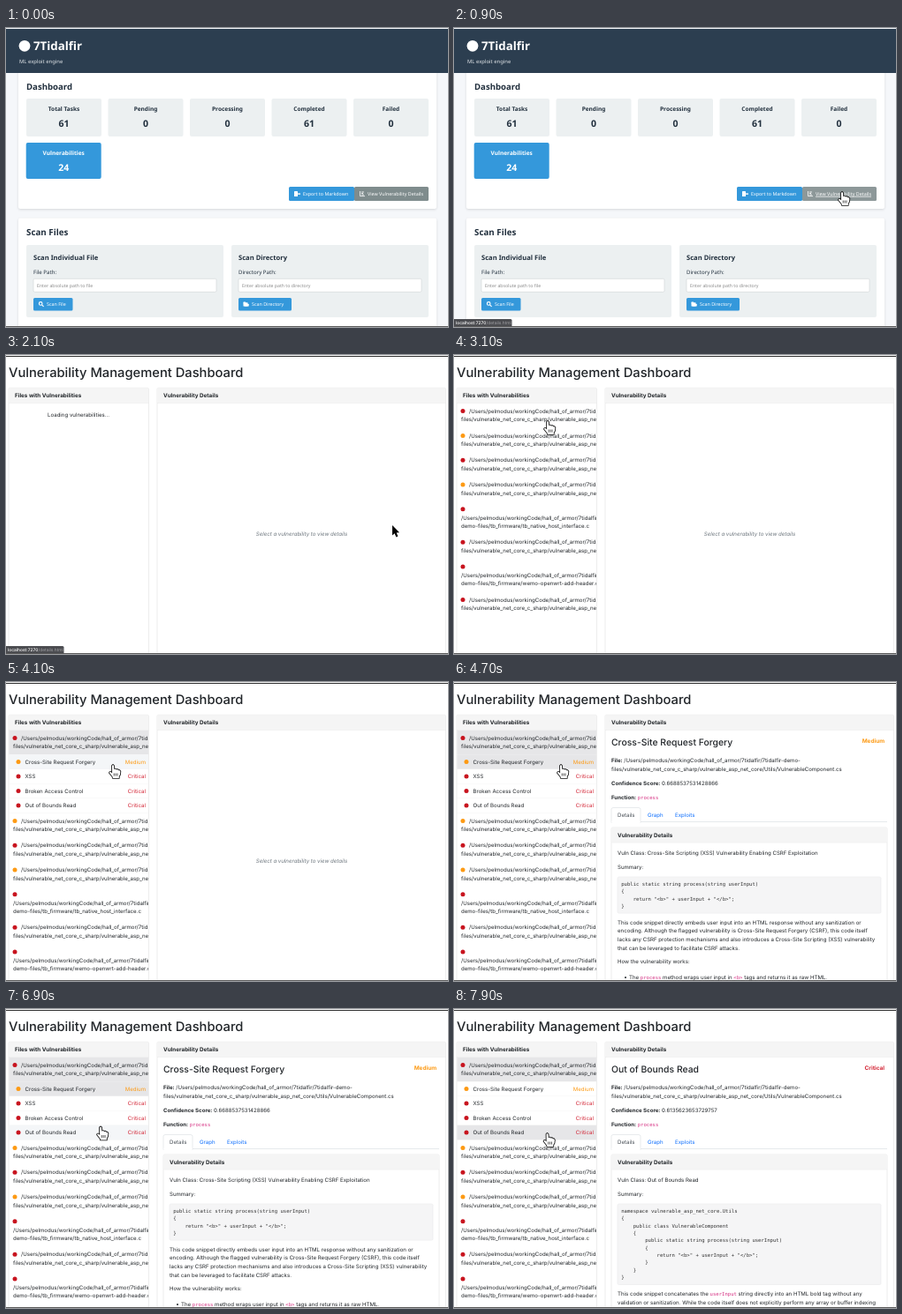
Animation of 500 by 339 pixels, one loop 8 s. Source, as an HTML page with a canvas:

```html
<!DOCTYPE html>
<html lang="en">
<head>
<meta charset="utf-8">
<title>Vulnerability Management Dashboard</title>
<style>
html, body { margin: 0; width: 100%; height: 100%; overflow: hidden; background: #fff; }
canvas { display: block; width: 500px; height: 339px; }
</style>
</head>
<body>
<canvas id="stage"></canvas>
<script>
const W = 500, H = 339, LOOP = 8000, STEP = 200;
const canvas = document.getElementById('stage');
const ctx = canvas.getContext('2d');
const dpr = window.devicePixelRatio || 1;
canvas.width = W * dpr;
canvas.height = H * dpr;
ctx.textRendering = 'geometricPrecision';

const NOTO = '"Noto Sans", "Open Sans", sans-serif';
const INTER = 'Inter, Roboto, sans-serif';
const MONO = '"DejaVu Sans Mono", monospace';
const INK = '#212529', NAVY = '#22303e', BLUE = '#3498db', PALE = '#ecf0f1';
const RED = '#c8141f', ORANGE = '#fd9a14', CODE = '#d63384';
const SELECTED = '#e6e6e8', HOVERED = '#f4f6f8', EDGE = '#e6e6e6';
const BODY = 6.1, LINE = 9.6;

// Moments when the interface changes
const AT = { page: 2100, list: 2300, statusOff: 2500, open: 3500, first: 4500, second: 7300 };

// Cursor tip: time, x, y
const PATH = [
  [100, 330, 60], [700, 425, 172], [900, 439, 186], [1500, 440, 194], [1900, 440, 194],
  [2100, 437, 193], [2300, 437, 193], [2900, 114, 84], [3100, 106, 75], [3500, 106, 75],
  [4100, 121, 94], [5300, 121, 94], [5900, 111.5, 112], [6500, 111.5, 112], [7100, 105.5, 141],
  [8000, 105.5, 141]
];

const ROOT = '/Users/pelmodus/workingCode/hall_of_armor/7tidalfir/';
const ASP = 'files/vulnerable_net_core_c_sharp/vulnerable_asp_net_core/Utils/VulnerableComponent.cs';
const asp = color => ({ color, lines: [ROOT, ASP] });
const firmware = name => ({ color: RED, lines: ['', ROOT, 'demo-files/tb_firmware/' + name] });
const FILES = [
  asp(RED), asp(ORANGE), asp(RED), asp(ORANGE),
  firmware('tb_native_host_interface.c'), asp(RED),
  firmware('wemo-openwrt-add-header.c'), asp(RED)
];
const ISSUES = ['Cross-Site Request Forgery', 'XSS', 'Broken Access Control', 'Out of Bounds Read'];

const DETAILS = {
  0: {
    score: '0.6688537531428866',
    type: 'Cross-Site Scripting (XSS) Vulnerability Enabling CSRF Exploitation',
    code: ['public static string process(string userInput)', '{',
      '    return "<b>" + userInput + "</b>";', '}'],
    prose: ['This code snippet directly embeds user input into an HTML response without any sanitization or',
      'encoding. Although the flagged vulnerability is Cross-Site Request Forgery (CSRF), this code itself',
      'lacks any CSRF protection mechanisms and also introduces a Cross-Site Scripting (XSS) vulnerability',
      'that can be leveraged to facilitate CSRF attacks.']
  },
  3: {
    score: '0.6135623653729757',
    type: 'Out of Bounds Read',
    code: ['namespace vulnerable_asp_net_core.Utils', '{', '    public class VulnerableComponent', '    {',
      '        public static string process(string userInput)', '        {',
      '            return "<b>" + userInput + "</b>";', '        }', '    }', '}'],
    prose: ['This code snippet concatenates the `userInput` string directly into an HTML bold tag without any',
      'validation or sanitization. While the code itself does not explicitly perform any array or buffer indexing']
  }
};

function rect(x, y, w, h, fill, stroke, r = 0) {
  ctx.beginPath();
  ctx.roundRect(x, y, w, h, r);
  if (fill) { ctx.fillStyle = fill; ctx.fill(); }
  if (stroke) { ctx.strokeStyle = stroke; ctx.lineWidth = 0.7; ctx.stroke(); }
}

function dot(x, y, r, color) {
  ctx.beginPath();
  ctx.arc(x, y, r, 0, 7);
  ctx.fillStyle = color;
  ctx.fill();
}

// y is the visual middle of the line; returns the right end
function text(str, x, y, { size = BODY, weight = 400, font = INTER, color = INK, align = 'left', style = '' } = {}) {
  ctx.font = `${style} ${weight} ${size}px ${font}`;
  ctx.textAlign = align;
  ctx.fillStyle = color;
  ctx.fillText(str, x, y + size * 0.35);
  return x + ctx.measureText(str).width;
}

// Backticks mark inline code
function rich(str, x, y) {
  str.split('`').forEach((part, i) => {
    x = text(part, x, y, i % 2 ? { size: 5.6, font: MONO, color: CODE } : {});
  });
}

function labelled(label, value, y) {
  rich(value, text(label, 178, y, { weight: 700 }) + 1.7, y);
}

const noto = (str, x, y, size, color = NAVY, weight = 700, align = 'left') =>
  text(str, x, y, { size, color, weight, align, font: NOTO });

function panel(y, h) {
  ctx.save();
  ctx.shadowColor = 'rgba(0,0,0,.13)';
  ctx.shadowBlur = 3 * dpr;
  ctx.shadowOffsetY = dpr;
  rect(14, y, 473, h, '#fff', null, 2);
  ctx.restore();
}

function stat(label, value, x, y, active) {
  const color = active ? '#fff' : NAVY;
  rect(x, y, 85, active ? 41 : 43, active ? BLUE : PALE, null, 2);
  noto(label, x + 42.5, y + 11.5, 6.5, color, 700, 'center');
  noto(value, x + 42.5, y + 28, 10.5, color, 700, 'center');
}

function button(label, x, y, w, h, fill, textX) {
  rect(x, y, w, h, fill, null, 1.5);
  return noto(label, textX, y + h / 2, 5.35, '#fff', 400);
}

function scanBox(title, label, hint, x) {
  rect(x, 246, 223, 82, PALE, null, 2);
  noto(title, x + 8, 260, 7.6);
  noto(label, x + 8, 277, 6.1, NAVY, 400);
  rect(x + 8, 284.3, 207, 15, '#fff', '#d5d8da', 1.5);
  noto(hint, x + 12, 292, 5.2, '#8b8b8b', 400);
}

function icons() {
  rect(326, 185, 4, 6, '#fff', null, 0.6);
  rect(329, 187.4, 4, 1.4, '#fff');
  ctx.strokeStyle = '#fff';
  ctx.lineWidth = 0.8;
  ctx.beginPath();
  ctx.moveTo(400.5, 185); ctx.lineTo(400.5, 190.6); ctx.lineTo(406, 190.6);
  for (let i = 0; i < 3; i++) { ctx.moveTo(402, 186 + i * 1.5); ctx.lineTo(405 - i % 2, 186 + i * 1.5); }
  ctx.stroke();
  ctx.lineWidth = 1.1;
  ctx.beginPath();
  ctx.arc(39.2, 312.4, 1.8, 0, 7);
  ctx.moveTo(40.6, 313.8); ctx.lineTo(42.6, 315.8);
  ctx.stroke();
  rect(268.5, 310.4, 2.6, 2, '#fff', null, 0.4);
  rect(268.5, 311.2, 5, 4.4, '#fff', null, 0.5);
  rect(269.7, 312.8, 5, 2.8, '#fff', null, 0.5);
}

function drawHome(hover) {
  rect(0, 0, W, H, '#f5f7fa');
  panel(48, 157);
  rect(0, 1, W, 50, '#2c3e50');
  dot(21, 20.3, 6.4, '#fff');
  noto('7Tidalfir', 31, 20.5, 13.3, '#fff');
  noto('ML exploit engine', 15, 38, 5.9, '#e3e7ea', 400);

  noto('Dashboard', 23, 66.5, 9.6);
  [['Total Tasks', 61], ['Pending', 0], ['Processing', 0], ['Completed', 61], ['Failed', 0]]
    .forEach(([label, n], i) => stat(label, n, 23 + i * 92.5, 80, false));
  stat('Vulnerabilities', 24, 22.7, 130, true);
  button('Export to Markdown', 320, 180, 74, 16, BLUE, 336);
  const end = button('View Vulnerability Details', 394, 180, 84, 16, hover ? '#8d9899' : '#7f8c8d', 409);
  if (hover) rect(409, 190.8, end - 409, 0.6, '#fff');

  panel(215.5, 130);
  noto('Scan Files', 23, 232, 9.8);
  scanBox('Scan Individual File', 'File Path:', 'Enter absolute path to file', 23);
  scanBox('Scan Directory', 'Directory Path:', 'Enter absolute path to directory', 255);
  button('Scan File', 31, 306, 44.5, 14.5, BLUE, 46);
  button('Scan Directory', 263, 306, 60, 14.5, BLUE, 278);
  icons();
}

function card(title, x, y, w, h) {
  rect(x, y, w, h, '#fff', EDGE, 1.5);
  rect(x + 0.3, y + 0.3, w - 0.6, 16.4, '#f5f5f5');
  rect(x, y + 16.7, w, 0.6, EDGE);
  text(title, x + 7, y + 8.8, { size: 6.3, weight: 700 });
}

function drawList(open, selected, hovered) {
  ctx.save();
  ctx.beginPath();
  ctx.rect(3.5, 54.5, 157.5, 284);
  ctx.clip();
  let y = 54.4;
  FILES.forEach((file, i) => {
    const h = 8.6 + file.lines.length * LINE;
    if (open && !i) rect(3, y, 159, h, SELECTED);
    dot(10, y + 9.2, 2.5, file.color);
    file.lines.forEach((line, j) => text(line, j ? 8 : 17, y + 9.2 + j * LINE));
    y += h;
    if (!open || i) return;
    ISSUES.forEach((name, k) => {
      const color = k ? RED : ORANGE, mid = y + 8.4;
      if (k === selected || k === hovered) rect(3, y, 159, 16.5, k === selected ? SELECTED : HOVERED);
      rect(3, y + 16.2, 159, 0.4, '#ececec');
      dot(14, mid, 2.5, color);
      text(name, 21.5, mid);
      text(k ? 'Critical' : 'Medium', 158, mid, { color: k ? '#d32535' : color, align: 'right' });
      y += 16.5;
    });
  });
  ctx.restore();
}

function drawDetails(index) {
  const d = DETAILS[index];
  text(ISSUES[index], 178, 68, { size: 10.4, weight: 500 });
  text(index ? 'Critical' : 'Medium', 487, 67, { size: 6.4, weight: 700, color: index ? '#d32535' : ORANGE, align: 'right' });
  labelled('File:', ROOT + '7tidalfir-demo-', 89);
  text(ASP, 178, 98.5);
  labelled('Confidence Score:', d.score, 114.5);
  labelled('Function:', '`process`', 131);

  rect(178, 158, 312, 0.7, '#dee2e6');
  rect(178, 142.5, 33, 17, '#fff', '#dee2e6', [2, 2, 0, 0]);
  rect(178.4, 157.6, 32.2, 3, '#fff');
  text('Details', 185, 150.5, { color: '#495057' });
  text('Graph', 219, 150.5, { color: '#0d6efd' });
  text('Exploits', 250, 150.5, { color: '#0d6efd' });

  card('Vulnerability Details', 178, 165, 312, 190);
  text('Vuln Class: ' + d.type, 185, 193.5);
  text('Summary:', 185, 210);
  const h = 7.5 + d.code.length * 8.4;
  rect(185, 221, 298, h, '#f5f5f6', '#ededee', 1.5);
  d.code.forEach((line, i) => text(line, 189.2, 228.9 + i * 8.36, { size: 5.6, font: MONO, color: '#333' }));

  const top = 221 + h + 10.6;
  d.prose.forEach((line, i) => rich(line, 185, top + i * LINE));
  if (!index) {
    text('How the vulnerability works:', 185, 316.8);
    dot(194, 335, 1, INK);
    rich('The `process` method wraps user input in `<b>` tags and returns it as raw HTML.', 198, 335);
  }
}

function drawManager(t, cursor) {
  rect(0, 0, W, H, '#fff');
  rect(0, 1, W, 1, '#2b2b2b');
  text('Vulnerability Management Dashboard', 3, 19.5, { size: 14.73, weight: 500 });
  card('Files with Vulnerabilities', 3, 37.3, 158.5, 310);
  card('Vulnerability Details', 171, 37.3, 326.5, 310);

  const shown = t >= AT.second ? 3 : t >= AT.first ? 0 : -1;
  if (t >= AT.list) {
    const hovered = cursor.x < 161 ? Math.floor((cursor.y - 82) / 16.5) : -1;
    drawList(t >= AT.open, shown, hovered);
  } else {
    text('Loading vulnerabilities...', 82, 68, { align: 'center' });
  }
  if (shown >= 0) drawDetails(shown);
  else text('Select a vulnerability to view details', 334.5, 203, { style: 'italic', color: '#6c757d', align: 'center' });
}

function drawStatus() {
  rect(0, 330, 65.5, 8, '#4b4c50', null, [0, 1.5, 0, 0]);
  const x = text('localhost:7270', 2, 334, { size: 4.9, weight: 500, color: '#fff' });
  text('/details.html', x, 334, { size: 4.9, color: '#a0a0a4' });
}

function shape(points, x, y) {
  ctx.beginPath();
  for (let i = 0; i < points.length; i += 2) ctx.lineTo(x + points[i], y + points[i + 1]);
  ctx.closePath();
}

const ARROW = [0, 0, 0, 11.5, 2.6, 9.2, 4.4, 13.4, 6.4, 12.5, 4.7, 8.4, 8, 8.2];
const HAND = [-1, 0.8, 0, 0, 1, 0.8, 1.3, 5, 3, 4.6, 4, 5.4, 5.6, 5.2, 6.4, 6.2, 7.6, 6.2, 8.4, 7.4,
  8, 11, 6.8, 13, 6.8, 15, -0.2, 15, -0.4, 13.4, -4, 9, -3.6, 8, -2.4, 8, -0.9, 9.6];

function drawCursor({ x, y }, hand) {
  ctx.lineJoin = 'round';
  shape(hand ? HAND : ARROW, x, y);
  ctx.fillStyle = hand ? '#fff' : '#000';
  ctx.strokeStyle = hand ? '#111' : '#fff';
  ctx.lineWidth = 1.7;
  ctx.stroke();
  ctx.fill();
  if (hand) {
    ctx.lineWidth = 0.7;
    ctx.beginPath();
    for (let i = 0; i < 3; i++) { ctx.moveTo(x + 1.2 + i * 1.9, y + 9.5); ctx.lineTo(x + 1.2 + i * 1.9, y + 12.5); }
    ctx.stroke();
  }
}

function cursorAt(t) {
  const i = Math.max(1, PATH.findIndex(p => p[0] > t));
  const [t0, x0, y0] = PATH[i - 1], [t1, x1, y1] = PATH[i];
  const u = Math.max(0, (t - t0) / (t1 - t0)), k = u * u * (3 - 2 * u);
  return { x: x0 + (x1 - x0) * k, y: y0 + (y1 - y0) * k };
}

function draw(now) {
  const time = now % LOOP;
  const t = time < 100 ? 0 : 100 + Math.floor((time - 100) / STEP) * STEP;
  const cursor = cursorAt(t);
  const home = t < AT.page;
  const onLink = home && t > 0 && cursor.x > 394 && cursor.x < 478 && cursor.y > 180 && cursor.y < 197;

  ctx.setTransform(dpr, 0, 0, dpr, 0, 0);
  if (home) drawHome(onLink);
  else drawManager(t, cursor);
  if (onLink || (!home && t < AT.statusOff)) drawStatus();
  rect(0, 338, W, 1, '#5a5a5a');
  if (t > 0) drawCursor(cursor, onLink || (t >= AT.list && cursor.x < 161));
}

const start = performance.now();
function tick() {
  draw(performance.now() - start);
  requestAnimationFrame(tick);
}
tick();
</script>
</body>
</html>
```
